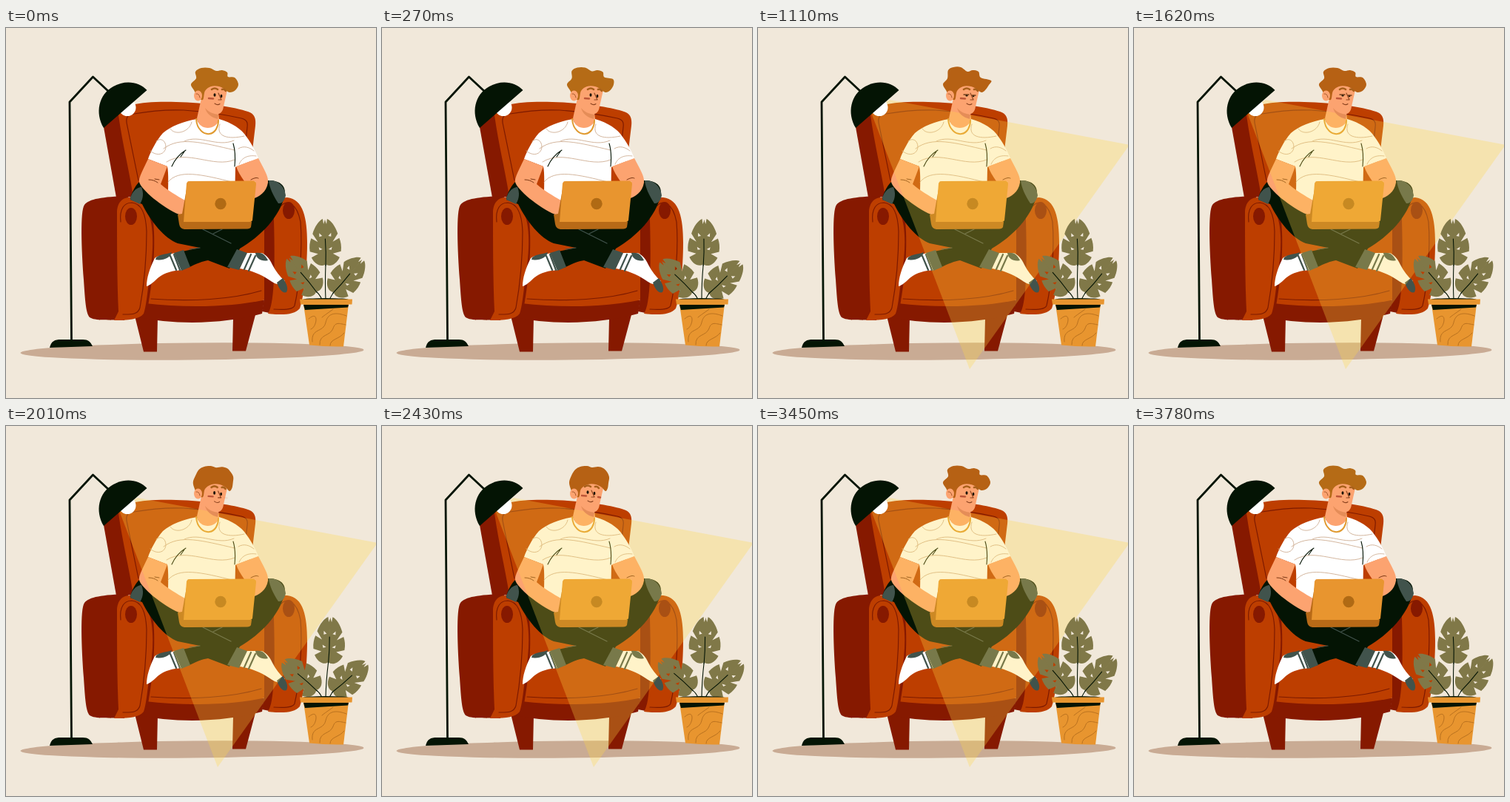
Write an HTML page that moves like this. It is 500 px wide and 500 px high and loops after 4.11 s.

```html
<!DOCTYPE html>
<html lang="en">
<head>
<meta charset="utf-8">
<title>Reading lamp</title>
<style>
html, body { margin: 0; width: 100%; height: 100%; overflow: hidden; background: #f1e8da; }
svg { display: block; width: 100vw; height: 100vh; }
.ink { fill: #041404; }
.dark { fill: #861900; }
.seat { fill: #bd3e00; }
.skin { fill: #fca370; }
.white { fill: #fff; }
.patch { fill: #41534c; }
.gold { fill: #e8952f; }
.brown { fill: #b56b16; }
.leaf { fill: #807848; fill-rule: evenodd; }
.line { fill: none; stroke-linecap: round; stroke-linejoin: round; }
.seam { stroke: #7d1a00; stroke-width: 1.2; }
.tan { stroke: #cfae93; stroke-width: .9; }
.thin { stroke: #041404; stroke-width: 1.1; }
.grain { stroke: #b9711f; stroke-width: 1; }
.crease { stroke: #41534c; stroke-width: 1.2; }
</style>
</head>
<body>
<svg viewBox="0 0 500 500" xmlns="http://www.w3.org/2000/svg">
<defs>
  <path id="half" class="leaf" d="M-.3,0C6,5 15,0 19,-9L10,-14L21,-17C22,-24 21,-30 19,-35L10,-30L17,-41C14,-51 8,-59 3,-61L2,-54L-.3,-60ZM4,-20L9,-23L8,-19ZM4,-38L8,-42L8,-37Z"/>
  <g id="leaf">
    <use href="#half"/><use href="#half" transform="scale(-1 1)"/>
    <path class="line thin" d="M0,2Q1,-16 0,-34"/>
  </g>
</defs>
<ellipse cx="251.5" cy="437" rx="232" ry="11.5" fill="#c9ab94" transform="rotate(-.5 251.5 437)"/>

<g id="chair">
  <path class="dark" d="M132,134L150,110L180,110L185,228L149,229Z"/>
  <path class="seat" d="M152,118C160,103 180,99 230,100C270,101 310,107 327,113C336,116 338,122 337,132L330,190L322,280L180,280L172,228C166,190 158,160 152,118Z"/>
  <path class="line seam" d="M179,206L163,128C162,120 165,117 173,116C190,113 215,110 240,111C270,113 300,118 318,122C325,124 327,127 326,134L321,180"/>
  <path class="dark" d="M173,385L186,437.500H204L205,390ZM307,392L306,436.500H324L338,384Z"/>
  <path class="dark" d="M178,368H349L346,386C295,400 230,402 174,390Z"/>
  <path class="seat" d="M185,250H352V367C300,378 240,378 188,372Z"/>
  <path class="line seam" d="M196,366C250,370 305,367 345,355"/>
  <path class="dark" d="M190,245L199,262C203,300 197,350 190,386H182Z"/>
  <path class="dark" d="M165,227C130,228 112,231 106,239C100,247 102,300 105,340C107,370 108,385 113,391C120,396 140,394 160,395Z"/>
  <path class="seat" d="M150,250C150,235 158,229 167,229C180,229 188,235 192,250C200,268 200,300 194,335C191,360 189,378 186,386C180,394 165,395 146,395L152,383C150,340 150,290 150,250Z"/>
  <path class="line seam" d="M155,262C153,244 160,236 170,236C182,237 189,248 190,275C190,310 186,350 181,378C178,388 168,387 158,387"/>
  <ellipse class="dark" cx="169" cy="254.500" rx="8" ry="11.500"/>
  <path class="dark" d="M349,255L366,240V387L346,383L349,365Z"/>
  <path class="seat" d="M362,260C361,240 365,229 380,229C402,231 407,258 407,290C407,330 402,365 397,379C390,388 372,388 354,386C362,375 364,330 362,260Z"/>
  <path class="line seam" d="M372,240C380,232 393,236 398,262C401,300 396,350 390,375C388,381 375,381 362,380"/>
  <ellipse class="dark" cx="382" cy="246.500" rx="8" ry="11.500"/>
</g>

<g id="legs">
  <path class="white" d="M228,304L238,327C225,328 215,330 205,338C198,345 192,349 190,349C190,338 194,325 201,311C207,306 215,308 228,304Z"/>
  <path class="patch" d="M203,310C209,305 217,306 224,303C223,310 212,315 202,313Z"/>
  <path class="white" d="M325,304L316,325C330,327 345,333 355,340C361,344 366,347 369,346L377,342C370,336 364,328 360,320C356,311 350,305 345,304Z"/>
  <path class="patch" d="M337,304C346,303 350,306 354,314C346,316 338,312 337,304ZM366,344L374,338C379,345 382,352 379,357C374,359 369,353 366,344Z"/>
  <path class="line" stroke="#41534c" stroke-width="2.200" d="M222,308L230,327M227,306L235,327M331,306L322,326M337,308L328,328"/>
  <path class="ink" d="M182,206C172,215 168,228 168,232L184,238C196,262 214,284 232,291L262,297L238,302L246,324C258,318 266,315 273,314L302,325L316,298C345,281 370,255 377,225C378,214 372,206 354,206L335,222L232,248Z"/>
  <path class="patch" d="M183,215C175,215 168,225 168,232L181,238C186,230 186,222 183,215ZM355,206C366,205 376,212 378,226C377,232 373,238 368,237C361,226 356,216 355,206Z"/>
  <path class="patch" d="M227,304L240,300L249,323L237,328ZM312,299L326,304L315,327L299,323Z"/>
  <path class="line crease" d="M266,272L304,291M292,272L280,278M248,299L262,297"/>
</g>

<g id="body">
  <path class="skin" d="M264,95L258,122C262,142 284,142 288,123L286,105Z"/>
  <path class="white" d="M258,123C240,126 222,133 212,142C203,152 195,168 192,177L218,187C220,197 219,215 219,228L240,240H309L310,188L341,176C338,168 333,158 325,147C318,136 305,128 288,123C285,138 262,140 258,123Z"/>
  <path class="line tan" d="M195,166C204,174 215,171 216,161C216,151 208,148 203,153M222,136C228,146 248,141 251,127M213,163C235,146 265,155 309,165M217,181C245,163 280,190 309,178M219,208C233,191 262,197 309,209M241,153C262,143 285,162 308,152M289,130C283,147 300,151 322,146M314,163C322,158 330,162 335,166M315,184C320,172 332,172 338,173"/>
  <path class="line thin" d="M243,165C235,170 228,178 224,187M241,167L236,174M307,156C310,166 310,177 309,187"/>
  <path class="line" stroke="#e09a30" stroke-width="2" d="M257,123C258,138 268,144 275,143C283,142 287,133 287,125"/>
  <path class="skin" d="M192,177C186,190 179,202 180,208C182,218 212,243 234,252C238,253 242,250 243,247L242,233C230,226 219,220 209,211L218,187Z"/>
  <path class="skin" d="M311,187L341,176C348,190 355,200 354,209C352,222 342,228 333,231L330,215L337,207H322C317,200 313,193 311,187Z"/>
  <path class="line" stroke="#7b3714" d="M193,205Q200,205 205,209M201,204L207,205M331,205Q338,201 341,203"/>
</g>

<g id="laptop">
  <path fill="#b86a17" d="M232,252L238,251L246,207L250,212L241,262H332L331,269Q330,271 326,271.500L241,272Q235,271 234,265Z"/>
  <path class="gold" d="M248,207L334,206.500Q338,207 338,211L333,260Q332,262 330,262H240L244,210Q245,207 248,207Z"/>
  <circle cx="290" cy="237.500" r="7.700" fill="#b06a14"/>
</g>

<path id="beam" d="M152,112L178,97L502,158L286,461Z" fill="#ffd646" fill-opacity=".29"/>

<g id="head">
  <path class="skin" d="M264,84V98C266,109 272,112 278,115C287,119 293,115 294,106L299,84C291,73 270,73 264,84Z"/>
  <path d="M269,108C274,114 280,116 287,117L286,123C278,121 271,116 269,108Z" fill="#e58d58"/>
  <path id="hair" class="brown"/>
  <ellipse class="skin" cx="259.500" cy="91.500" rx="5.500" ry="7"/>
  <path class="line" stroke="#a8592d" d="M257,89Q261,88 262,94"/>
  <g id="face" class="line">
    <path stroke="#a8601a" stroke-width="2.600" d="M278,83Q282,80 286,83M292,83Q295,82 297,85"/>
    <g id="eyes" fill="#1c1408"><ellipse cx="282" cy="90.500" rx="1.500" ry="2.300"/><ellipse cx="291" cy="92" rx="1.400" ry="2.200"/></g>
    <path id="lids" stroke="#70401c" stroke-width="1.300" d="M278,90H285M289,91H294"/>
    <path stroke="#8a431f" stroke-width="1.100" d="M287,88L291,97L287,97M282,102Q286,105 289,102.500"/>
    <path stroke="#bd5638" stroke-width="2.400" d="M274,95L280,95.500"/>
    <path id="cheek" stroke="#bd5638" stroke-width="2.400" d="M296,97L299,97.500"/>
  </g>
</g>

<g id="lamp">
  <path class="line" stroke="#041404" stroke-width="2.800" stroke-linejoin="miter" d="M88.500,422L86,100L117.500,66L140,87"/>
  <path class="ink" d="M59,432C61,423 66,421 74,421H104C111,421 114,424 117,430Z"/>
  <circle class="white" cx="164" cy="107.500" r="11.500"/>
  <path class="ink" d="M132,135C120,115 125,90 145,79C160,70 180,72 190.500,84Z"/>
</g>

<g id="plant">
  <path id="stems" class="line thin"/>
  <use id="left" href="#leaf"/><use id="right" href="#leaf"/><use id="top" href="#leaf"/>
  <ellipse class="ink" cx="432" cy="367" rx="31" ry="2"/>
  <path class="gold" d="M402,373L410,428.500Q432,431 456,430.500L463,373Z"/>
  <path class="line grain" d="M409,393C424,380 420,405 412,407M414,424C412,405 429,412 432,398C435,384 447,384 460,389M424,428C423,413 438,417 442,406C445,396 452,400 459,401M438,429C438,420 450,421 457,412M427,391C433,386 440,382 442,380"/>
  <path class="ink" d="M402,374H463L462,377.500L404,381Z"/>
  <path class="gold" d="M397,366.500H468L467.500,373.500H398Z"/>
</g>
</svg>
<script>
const LOOP = 4110;
const $ = id => document.getElementById(id);

// Hair outlines, as points of a smooth closed curve
const curly = [254,84, 250,76, 257,68, 256,59, 264,54, 275,54, 284,58, 292,57, 299,60, 300,66, 309,67, 314,76, 310,84, 302,87, 296,83, 288,79, 277,79, 269,85, 266,97, 259,93];
const spiky = [254,84, 250,76, 256,68, 257,57, 264,53, 274,53, 283,59, 290,57, 298,59, 301,67, 315,71, 312,77, 307,84, 302,87, 296,83, 288,79, 277,79, 269,85, 266,97, 259,93];
const flat = [255,85, 253,76, 256,67, 261,59, 268,55, 277,54, 284,56, 292,55, 299,57, 304,62, 307,69, 306,77, 305,84, 302,88, 297,83, 289,79, 278,79, 269,85, 266,96, 259,93];
const hairKeys = [[0, curly], [540, spiky], [1110, spiky], [1600, curly], [2100, flat], [2520, flat], [2970, curly], [LOOP, curly]];
const lightOn = [[420, 510], [660, 3510]];

const mix = (a, b, k) => a + (b - a) * k;
const ease = k => (1 - Math.cos(Math.PI * Math.min(1, Math.max(0, k)))) / 2;
const ramp = (t, a, b) => ease((t - a) / (b - a));
const plateau = (t, a, b, c, d) => ramp(t, a, b) - ramp(t, c, d);
const swing = (t, a, b) => plateau(t, a, (a + b) / 2, (a + b) / 2, b);

function smooth(p) {
  const n = p.length / 2;
  const at = i => { i = (i + n) % n; return [p[2 * i], p[2 * i + 1]]; };
  let d = `M${at(0)}`;
  for (let i = 0; i < n; i++) {
    const [a, b, c, e] = [at(i - 1), at(i), at(i + 1), at(i + 2)];
    d += `C${b.map((v, j) => v + (c[j] - a[j]) / 6)} ${c.map((v, j) => v - (e[j] - b[j]) / 6)} ${c}`;
  }
  return d + 'Z';
}

function hairAt(t) {
  const i = hairKeys.findIndex(([end]) => end > t);
  const [t0, from] = hairKeys[i - 1], [t1, to] = hairKeys[i];
  const k = ramp(t, t0, t1);
  return smooth(from.map((v, j) => mix(v, to[j], k)));
}

function place(id, x, y, angle, size) {
  $(id).setAttribute('transform', `translate(${x} ${y}) rotate(${angle}) scale(${size})`);
}

function drawPlant(s) {
  const top = [mix(432, 437, s), 319];
  const left = [mix(419, 419, s), mix(356, 357, s)];
  const right = [mix(443, 442, s), mix(357, 359, s)];
  place('top', ...top, mix(-1, 4, s), 1);
  place('left', ...left, mix(-39, -52, s), .97);
  place('right', ...right, mix(41, 53, s), .97);
  $('stems').setAttribute('d',
    `M432,367Q${mix(431, 433, s)},345 ${top}M427,367Q424,360 ${left}M437,367Q440,361 ${right}`);
}

function draw(t) {
  drawPlant(swing(t, 15, 1110) + swing(t, 1650, 2760));

  const lit = lightOn.some(([a, b]) => t >= a && t < b);
  $('beam').style.display = lit ? '' : 'none';
  $('hair').style.fill = lit ? '#b66114' : '';

  $('hair').setAttribute('d', hairAt(t));
  const turn = plateau(t, 1950, 2250, 2520, 2850);
  $('face').setAttribute('transform', `translate(${-4 * turn} ${-turn})`);
  $('cheek').style.opacity = turn;

  const sleepy = plateau(t, 930, 1080, 1650, 1800);
  $('eyes').setAttribute('transform', `translate(0 ${92 * .45 * sleepy}) scale(1 ${1 - .45 * sleepy})`);
  $('lids').style.opacity = sleepy;
}

const start = performance.now();
function tick() {
  const t = (performance.now() - start) % LOOP;
  draw(Math.floor(t / 30) * 30);
  requestAnimationFrame(tick);
}
tick();
</script>
</body>
</html>
```
